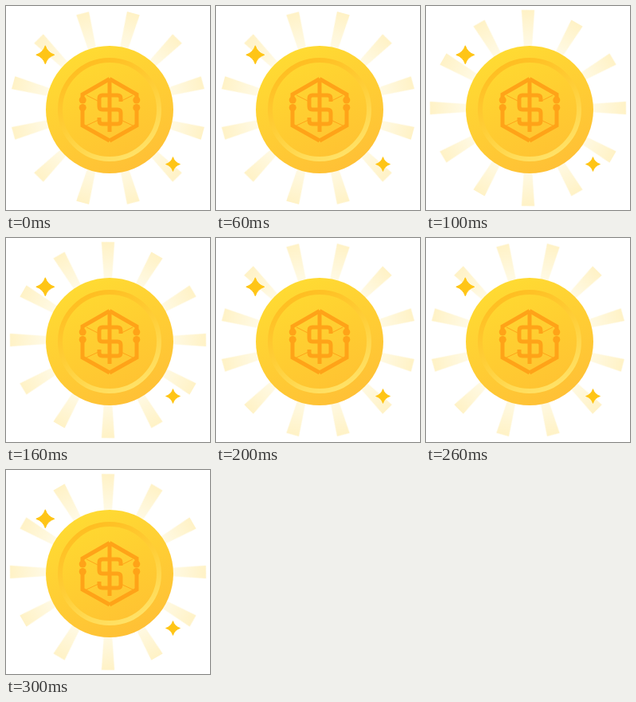
Write an HTML page that moves like this. It is 256 by 256 pixels and loops after 0.4 s.

```html
<!DOCTYPE html>
<html lang="en">
<head>
<meta charset="utf-8">
<title>Shining coin</title>
<style>
  html, body { margin: 0; width: 100%; height: 100%; overflow: hidden; background: #fff; }
  svg { display: block; width: 100%; height: 100%; }
  #rays { animation: spin 400ms steps(4) infinite; }
  @keyframes spin {
    from { transform: rotate(15deg); }
    to { transform: rotate(75deg); }
  }
</style>
</head>
<body>
<svg viewBox="0 0 256 256">
  <defs>
    <linearGradient id="glow" gradientUnits="userSpaceOnUse" x1="0" y1="-123" x2="0" y2="-76">
      <stop offset="0" stop-color="#fff2c6"/>
      <stop offset="1" stop-color="#fffae6"/>
    </linearGradient>
    <linearGradient id="rim" x1=".25" y1="0" x2=".75" y2="1">
      <stop offset="0" stop-color="#ffdc32"/>
      <stop offset="1" stop-color="#ffbf36"/>
    </linearGradient>
    <linearGradient id="groove" x1=".25" y1="0" x2=".75" y2="1">
      <stop offset="0" stop-color="#ffbd20"/>
      <stop offset=".5" stop-color="#ffcf38"/>
      <stop offset="1" stop-color="#ffe36a"/>
    </linearGradient>
    <linearGradient id="face" x1=".25" y1="0" x2=".75" y2="1">
      <stop offset="0" stop-color="#ffd830"/>
      <stop offset="1" stop-color="#ffc232"/>
    </linearGradient>
    <path id="ray" d="M-8.2-123H8.2L5-76H-5Z" fill="url(#glow)"/>
    <path id="star" d="M0-11.5Q2.8-2.8 11.5 0Q2.8 2.8 0 11.5Q-2.8 2.8-11.5 0Q-2.8-2.8 0-11.5Z"
          fill="#ffc516" stroke="#ffc516" stroke-linejoin="round"/>
    <g id="half">
      <path d="M0-38.5L-34-19V-13M-34-2V20L0 39" stroke-width="5"/>
      <path d="M-29-18L-14-10.5M-29 20L-14 13" stroke-width="1"/>
      <g fill="#ffa318" stroke="none">
        <circle cx="-33.8" cy="-12" r="4.5"/>
        <circle cx="-33.8" cy="-2.5" r="4.5"/>
      </g>
    </g>
  </defs>

  <g transform="translate(128 128)"><g id="rays"></g></g>

  <circle cx="130" cy="130" r="80" fill="url(#rim)"/>
  <circle cx="130" cy="130" r="62" fill="url(#face)" stroke="url(#groove)" stroke-width="6"/>

  <g transform="translate(130 130)" fill="none" stroke="#ffa318">
    <use href="#half"/>
    <use href="#half" transform="scale(-1 1)"/>
    <path d="M14-10V-14Q14-18 10-18H-9Q-13-18-13-14V-4Q-13 0-9 0H10Q14 0 14 4V14Q14 18 10 18H-9Q-13 18-13 14V10" stroke-width="5"/>
    <path d="M0-39V28" stroke-width="5"/>
  </g>

  <use href="#star" transform="translate(49.3 61.3)"/>
  <use href="#star" transform="translate(209.5 198.5) scale(.78)"/>
</svg>
<script>
  const rays = document.getElementById('rays');
  for (let i = 0; i < 12; i++) {
    const ray = document.createElementNS('http://www.w3.org/2000/svg', 'use');
    ray.setAttribute('href', '#ray');
    ray.setAttribute('transform', `rotate(${i * 30})`);
    rays.append(ray);
  }
</script>
</body>
</html>
```
